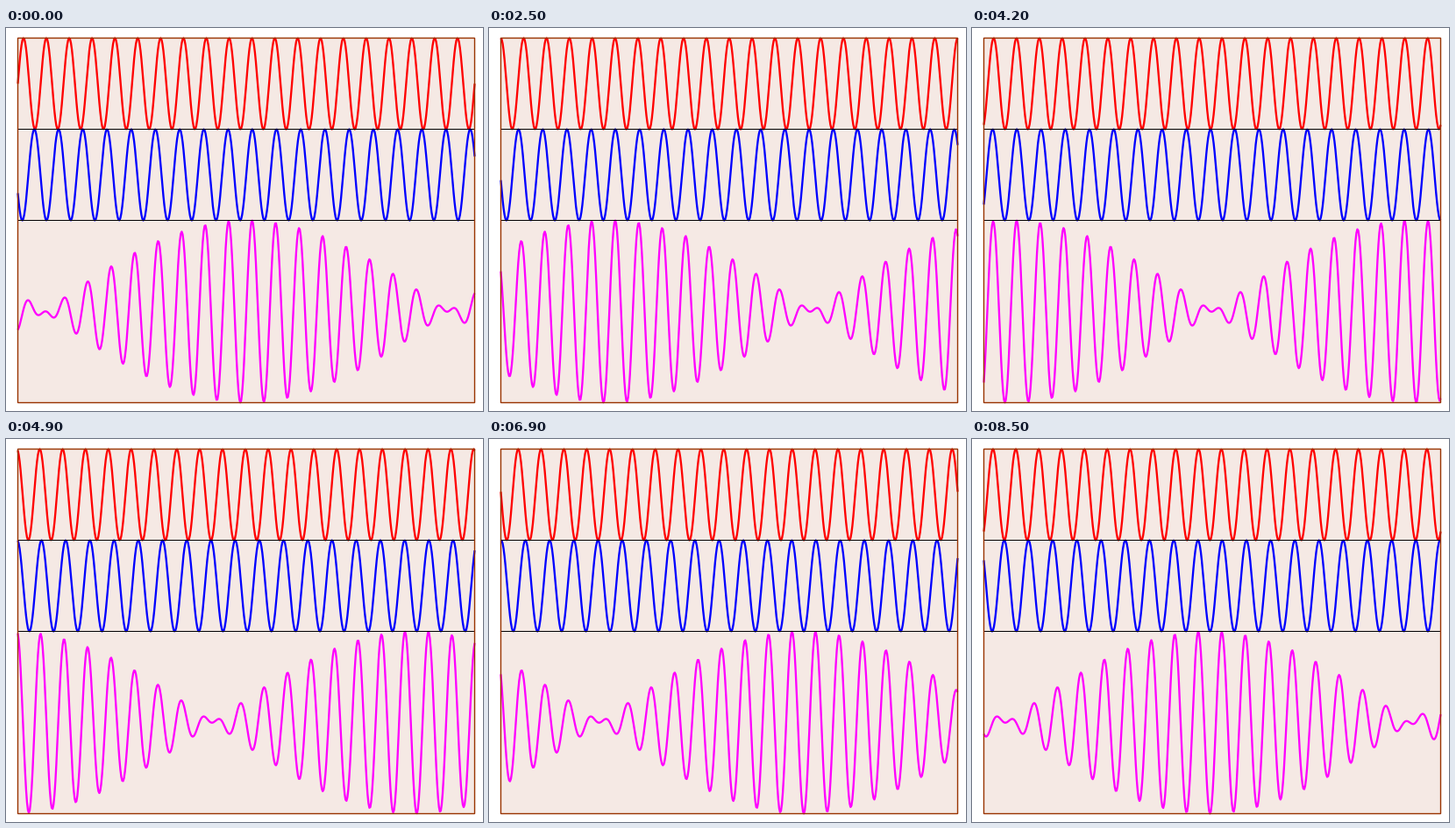
A matplotlib script for the animation above (8600 ms loop, 544x437 px).

```python
import numpy as np
import matplotlib.pyplot as plt
from matplotlib.animation import FuncAnimation
from matplotlib.patches import Rectangle

W, H, DPI = 544, 437, 128
FRAMES, STEP_MS = 86, 100

LEFT, RIGHT, TOP, BOTTOM = 13.5, 534.5, 11.5, 427.5
AMP = 52
RATIO = 1.06      # wavelength of the blue wave relative to the red one
SHIFT = 0.21      # red wavelengths travelled per frame


def px(n):
    """Line width in points for n pixels."""
    return n * 72 / DPI


fig = plt.figure(figsize=(W / DPI, H / DPI), dpi=DPI, facecolor="white")
ax = fig.add_axes([0, 0, 1, 1])
ax.set_xlim(0, W)
ax.set_ylim(H, 0)
ax.axis("off")

box = (LEFT, TOP), RIGHT - LEFT, BOTTOM - TOP
ax.add_patch(Rectangle(*box, facecolor="#f5e9e4", edgecolor="none", zorder=0))
ax.add_patch(Rectangle(*box, fill=False, edgecolor="#993300",
                       linewidth=px(1.4), snap=False, zorder=4))
for y in (TOP + 2 * AMP, TOP + 4 * AMP):
    ax.plot([LEFT, RIGHT], [y, y], color="black", lw=px(1), snap=False,
            solid_capstyle="butt", zorder=3)

u = np.linspace(-10, 10, 500)
xs = LEFT + (u + 10) / 20 * (RIGHT - LEFT)


def curve(color):
    return ax.plot([], [], color=color, lw=px(2.3), snap=False,
                   solid_capstyle="butt", solid_joinstyle="round", zorder=2)[0]


red, blue, total = curve("#ff0000"), curve("#0000ff"), curve("#ff00ff")


def draw(i):
    phase = 2 * np.pi * (u + SHIFT * i)
    a, b = np.sin(phase), np.sin(phase / RATIO)
    red.set_data(xs, TOP + AMP - AMP * a)
    blue.set_data(xs, TOP + 3 * AMP - AMP * b)
    total.set_data(xs, TOP + 6 * AMP - AMP * (a + b))
    return red, blue, total


anim = FuncAnimation(fig, draw, frames=FRAMES, interval=STEP_MS,
                     repeat=True, repeat_delay=0)
plt.show()
```
